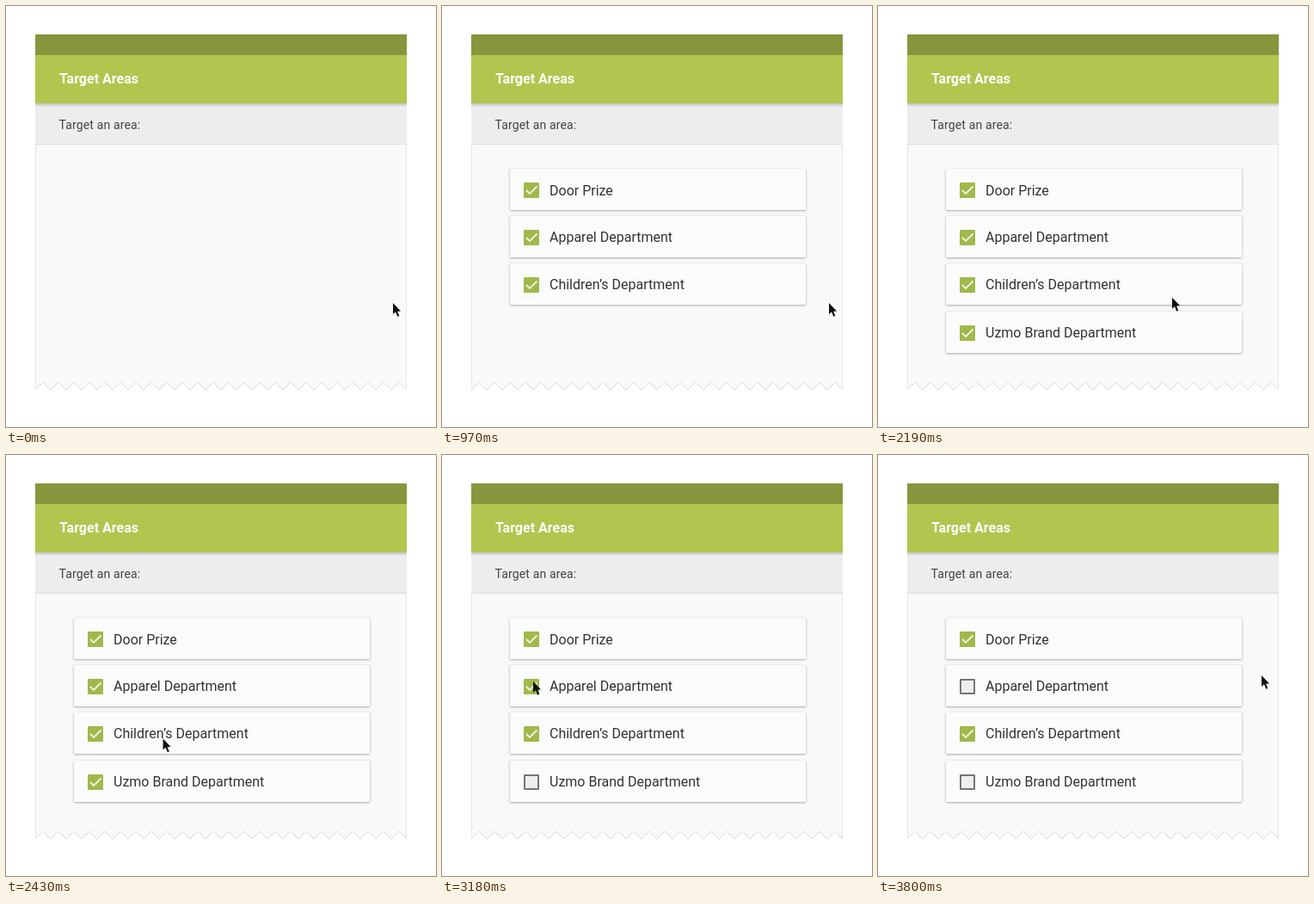
Write an HTML page with a canvas that moves like this. It is 500 px wide and 489 px high and loops after 4.53 s.

```html
<!DOCTYPE html>
<html lang="en">
<head>
<meta charset="utf-8">
<title>Target Areas</title>
<style>
html, body { margin: 0; width: 100%; height: 100%; overflow: hidden; background: #fff; }
canvas { display: block; width: 500px; height: 489px; }
</style>
</head>
<body>
<canvas id="stage" width="500" height="489"></canvas>
<script>
const ctx = document.getElementById('stage').getContext('2d');
const LOOP = 4530;
const LEFT = 34, RIGHT = 466;
const FONT = 'Roboto, "Noto Sans", sans-serif';

// top, label, baseline, time shown, time unchecked
const cards = [
  { top: 189, label: 'Door Prize', base: 220, from: 200, off: Infinity },
  { top: 244, label: 'Apparel Department', base: 274, from: 370, off: 3560 },
  { top: 299, label: 'Children\u2019s Department', base: 329, from: 970, off: Infinity },
  { top: 355, label: 'Uzmo Brand Department', base: 385, from: 1500, off: 2580 }
];

// [time, x, y] along each leg of the pointer's way
const legs = [
  [[2040, 450, 345], [2190, 342, 338.7], [2550, 104, 325]],
  [[2580, 104, 325], [2700, 104.8, 321], [2940, 107.3, 307], [3120, 107, 281],
   [3180, 106, 263], [3330, 104, 215]],
  [[3560, 104, 215], [3800, 446, 256]]
];

function slope(keys, i, c) {
  const rate = j => (keys[j + 1][c] - keys[j][c]) / (keys[j + 1][0] - keys[j][0]);
  if (i === 0) return rate(0);
  if (i === keys.length - 1) return rate(i - 1);
  const a = rate(i - 1), b = rate(i);
  return a * b <= 0 ? 0 : 2 * a * b / (a + b);
}

function track(keys, t, c) {
  const last = keys.length - 1;
  if (t <= keys[0][0]) return keys[0][c];
  if (t >= keys[last][0]) return keys[last][c];
  let i = 0;
  while (t >= keys[i + 1][0]) i++;
  const h = keys[i + 1][0] - keys[i][0];
  const u = (t - keys[i][0]) / h, v = 1 - u;
  return v * v * (1 + 2 * u) * keys[i][c] + u * u * (3 - 2 * u) * keys[i + 1][c]
    + h * u * v * (v * slope(keys, i, c) - u * slope(keys, i + 1, c));
}

function pointerAt(t) {
  let leg = legs[0];
  for (const k of legs) if (t >= k[0][0]) leg = k;
  const start = leg[0][0];
  const step = start + Math.floor((t - start) / 30) * 30;
  return [track(leg, step, 1), track(leg, step, 2)];
}

function rect(x, y, w, h, color) {
  ctx.fillStyle = color;
  ctx.fillRect(x, y, w, h);
}

function path(points, close) {
  ctx.beginPath();
  points.forEach(([x, y]) => ctx.lineTo(x, y));
  if (close) ctx.closePath();
}

function text(str, x, y, font, color, spacing = '0px') {
  ctx.font = font + ' ' + FONT;
  ctx.letterSpacing = spacing;
  ctx.fillStyle = color;
  ctx.fillText(str, x, y);
}

function drawPanel() {
  const teeth = [];
  for (let i = 0; i <= 48; i++) teeth.push([LEFT + i * 9, i % 2 ? 437 : 446]);
  path([[RIGHT, 114], [LEFT, 114], ...teeth], true);
  ctx.fillStyle = '#f9f9f9';
  ctx.fill();
  path(teeth);
  ctx.strokeStyle = '#d9d9d9';
  ctx.lineWidth = 1;
  ctx.stroke();

  rect(LEFT, 160, 1, 286, '#e9e9e9');
  rect(RIGHT - 1, 160, 1, 286, '#e9e9e9');

  rect(LEFT, 113, 432, 47, '#ededed');
  rect(LEFT, 160, 432, 1, '#dcdcdc');
  const shade = ctx.createLinearGradient(0, 113, 0, 117);
  shade.addColorStop(0, 'rgba(0,0,0,.2)');
  shade.addColorStop(1, 'rgba(0,0,0,0)');
  rect(LEFT, 113, 432, 4, shade);

  rect(LEFT, 33, 432, 24, '#86963c');
  rect(LEFT, 57, 432, 56, '#b0c64e');
  text('Target Areas', 62, 90, '700 16px', '#fff');
  text('Target an area:', 61.5, 143, '14px', '#444', '0.15px');
}

function drawBox(x, y, checked) {
  ctx.beginPath();
  ctx.roundRect(x, y, 18, 18, 1);
  ctx.fillStyle = checked ? '#a0b94c' : '#757575';
  ctx.fill();
  if (!checked) {
    rect(x + 2, y + 2, 14, 14, '#eeeeee');
    return;
  }
  path([[x + 3, y + 9], [x + 7, y + 13], [x + 15.5, y + 4.5]]);
  ctx.strokeStyle = '#f0f4e0';
  ctx.lineWidth = 1.8;
  ctx.stroke();
}

function drawCard(card, t) {
  ctx.save();
  ctx.shadowColor = 'rgba(0,0,0,.38)';
  ctx.shadowBlur = 2.5;
  ctx.shadowOffsetY = 0.8;
  ctx.beginPath();
  ctx.roundRect(79, card.top, 344, 48, 1.5);
  ctx.fillStyle = '#fbfbfb';
  ctx.fill();
  ctx.restore();
  drawBox(95, card.top + 16, t < card.off);
  text(card.label, 125, card.base, '16px', '#333');
}

function drawPointer(x, y) {
  const shape = [[0, 0], [0, 13], [3, 10.3], [5.2, 15.8], [7.3, 15], [5.1, 9.7], [9, 9.4]];
  path(shape.map(([px, py]) => [x + px, y + py]), true);
  ctx.fillStyle = '#111';
  ctx.fill();
}

function draw(t) {
  rect(0, 0, 500, 489, '#fff');
  drawPanel();
  for (const card of cards) if (t >= card.from) drawCard(card, t);
  drawPointer(...pointerAt(t));
}

const begin = performance.now();
function frame() {
  draw((performance.now() - begin) % LOOP);
  requestAnimationFrame(frame);
}
frame();
</script>
</body>
</html>
```
